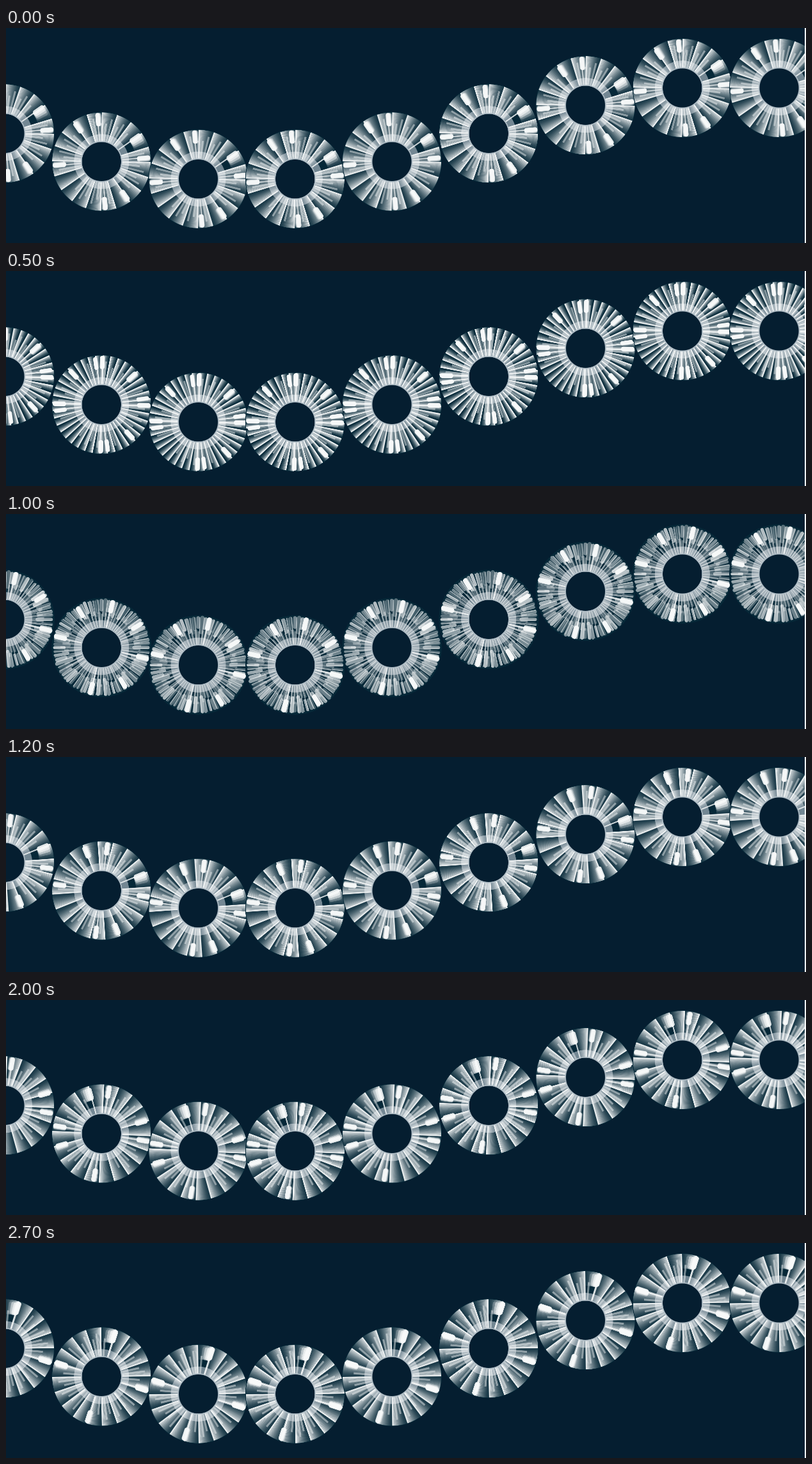
An HTML page with a canvas for the animation above (2.8 s loop, 1250 by 337 pixels).

```html
<!DOCTYPE html>
<html lang="en">
<head>
<meta charset="utf-8">
<title>Rotating discs</title>
<style>
html, body { margin: 0; width: 100%; height: 100%; overflow: hidden; background: #fff; }
canvas { display: block; }
</style>
</head>
<body>
<canvas id="stage" width="1250" height="337"></canvas>
<script>
const LOOP = 2800, STEP = 100, SCALE = 2, SIZE = 164;
const BG = '#051e30', DISC = '#062838';
const INNER = 31, OUTER = 77;
const ctx = document.getElementById('stage').getContext('2d');
const tile = document.createElement('canvas');
tile.width = tile.height = SIZE * SCALE;
const pen = tile.getContext('2d');

// [time, value] keys, joined by straight lines
const LEAD = [[0, 55], [300, 45], [800, 50], [1200, 68], [1700, 68], [2300, 81], [2700, 107], [2800, 145]];
const BLOCK = [[0, -5], [300, -12], [800, 20], [1200, 7], [1700, 7], [2300, 13], [2700, 18], [2800, 85]];
const SPREAD = [[0, 18], [300, 8], [800, 5], [1200, 18], [1600, 0.5], [2000, -18], [2800, -18]];
const MIDS = [-48, -41, -30, -24, -12, 24, 34];

function at(keys, t) {
  let i = 1;
  while (i < keys.length - 1 && t > keys[i][0]) i++;
  const [t0, a] = keys[i - 1], [t1, b] = keys[i];
  return a + (b - a) * (t - t0) / (t1 - t0);
}

function random(seed) {
  return () => {
    seed = (seed * 16807) % 2147483647;
    return seed / 2147483647;
  };
}

const rad = deg => deg * Math.PI / 180;
const white = alpha => `rgba(248,250,250,${alpha})`;

// angle in degrees, clockwise from the top
function ray(angle, r0, r1, width, alpha, cap = 'butt') {
  const x = Math.sin(rad(angle)), y = -Math.cos(rad(angle));
  pen.lineCap = cap;
  pen.lineWidth = width;
  pen.strokeStyle = white(alpha);
  pen.beginPath();
  pen.moveTo(x * r0, y * r0);
  pen.lineTo(x * r1, y * r1);
  pen.stroke();
}

function circle(r, fill, stroke, width) {
  pen.beginPath();
  pen.arc(0, 0, r, 0, Math.PI * 2);
  if (fill) { pen.fillStyle = fill; pen.fill(); }
  if (stroke) { pen.strokeStyle = stroke; pen.lineWidth = width; pen.stroke(); }
}

// a sector fading away from its bright leading edge
function fan(angle, spread, r0, r1) {
  const count = Math.ceil(Math.abs(spread) * 1.2), slice = spread / count;
  pen.lineCap = 'butt';
  pen.lineWidth = r1 - r0;
  for (let i = 0; i < count; i++) {
    const a = rad(angle + i * slice - 90), b = rad(angle + (i + 1) * slice - 90);
    pen.strokeStyle = white(0.06 + 0.84 * (1 - i / count) ** 1.6);
    pen.beginPath();
    pen.arc(0, 0, (r0 + r1) / 2, a, b, spread < 0);
    pen.stroke();
  }
  ray(angle, r0, r1, 1.8, 0.9);
}

function thick(angle, spread, r0, r1, width) {
  for (let i = 3; i >= 0; i--) {
    ray(angle + spread * i / 3, r0, r1, width, 0.9 - i * 0.23, 'round');
  }
}

function scatter(lead) {
  const rnd = random(4711);
  for (let i = 0; i < 72; i++) {
    const a = lead + i * 5 + rnd() * 2;
    ray(a, 50 + rnd() * 10, 72 + rnd() * 2.5, 4 + rnd() * 2.5, 0.25 + rnd() * 0.5, 'round');
    ray(a + rnd() * 4, INNER, 52 + rnd() * 12, 3, 0.35);
  }
  for (let i = 0; i < 60; i++) {
    ray(lead + i * 6 + rnd() * 3, INNER, 75, 1.3, 0.55);
  }
}

function drawDisc(t) {
  const lead = at(LEAD, t), block = at(BLOCK, t), spread = at(SPREAD, t);
  const scattered = t >= 600 && t <= 1000;
  const dense = t >= 200 && t < 600;
  const special = t > 1900 ? lead - 90 : lead;

  pen.setTransform(SCALE, 0, 0, SCALE, tile.width / 2, tile.height / 2);
  pen.clearRect(-SIZE / 2, -SIZE / 2, SIZE, SIZE);
  circle(78, DISC);
  circle(37, null, 'rgba(188,199,208,.6)', 12);

  if (scattered) {
    scatter(lead);
  } else {
    const count = dense ? 40 : 20, gap = 360 / count;
    for (let i = 0; i < count; i++) {
      const first = i === 0 && !dense;
      fan(special + i * gap, spread, first ? 54 : INNER, OUTER);
      if (first) ray(special, INNER, 56, 2, 0.8);
    }
  }

  for (let q = 0; q < 4; q++) {
    const turn = q * 90;
    if (!scattered) {
      MIDS.forEach((m, i) => ray(lead + m + turn, INNER, i % 2 ? 68 : 60, 3, 0.45));
    }
    ray(block + turn, INNER, 60, 2.5, 0.7);
    thick(block + turn, spread * 0.14, 59, 73, 7);
    if (dense) thick(block - 9 + turn, 1, 58, 72, 6);
    if (q !== 2) {
      const trail = scattered ? 0 : spread * (q === 0 ? 0.5 : 0.2);
      thick(special + turn, trail, 58, 71, 7);
    }
  }

  circle(INNER, BG);
  circle(31.5, null, 'rgba(178,191,199,.85)', 2);
}

function draw(t) {
  drawDisc(t);
  ctx.fillStyle = '#fff';
  ctx.fillRect(0, 0, 1250, 337);
  ctx.save();
  ctx.beginPath();
  ctx.rect(0, 0, 1248, 337);
  ctx.clip();
  ctx.fillStyle = BG;
  ctx.fillRect(0, 0, 1248, 337);
  for (let i = 0; i < 9; i++) {
    const x = -2 + i * 151.25;
    const y = 165.3 + 75 * Math.sin(i * Math.PI / 5);
    ctx.drawImage(tile, x - SIZE / 2, y - SIZE / 2, SIZE, SIZE);
  }
  ctx.restore();
}

const start = performance.now();
let shown = -1;
function tick() {
  const elapsed = Math.max(0, performance.now() - start) % LOOP;
  const t = Math.floor(elapsed / STEP) * STEP;
  if (t !== shown) draw(shown = t);
  requestAnimationFrame(tick);
}
tick();
</script>
</body>
</html>
```
